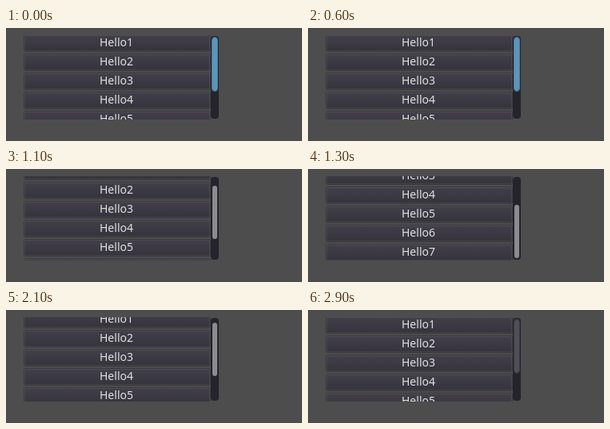
Animation, 370 px wide and 142 px high, one loop 3500 ms. Source, as an HTML page:

```html
<!DOCTYPE html>
<html lang="en">
<head>
<meta charset="utf-8">
<title>Scrolling list</title>
<style>
@property --s { syntax: "<number>"; inherits: true; initial-value: 0; }

html, body { margin: 0; width: 100%; height: 100%; overflow: hidden; background: #4d4d4d; }

#stage {
  position: relative; width: 370px; height: 142px; overflow: hidden;
  background: #4d4d4d;
  animation: scroll 3.5s step-end infinite;
}
#view { position: absolute; left: 22px; top: 9px; width: 234px; height: 106px; overflow: hidden; }
#list { position: absolute; left: 1px; top: calc(var(--s) * -1px); width: 232px; }

.item {
  box-sizing: border-box; height: 20px; margin-bottom: 4px; padding-right: 2px;
  border-radius: 2px;
  background: linear-gradient(#423f4a, #35333c);
  box-shadow: inset 0 0 0 1px rgba(255, 255, 255, .07), 0 0 0 1px rgba(30, 28, 34, .4);
  font: 14px/18px "Noto Sans", "Open Sans", sans-serif;
  color: #e0e0e0; text-align: center;
}
.item:first-child { animation: hover 3.5s step-end infinite; }

#bar {
  position: absolute; left: 256px; top: 10px; width: 10px; height: 104px;
  border-radius: 4px; background: #25232b;
}
#thumb {
  position: absolute; box-sizing: border-box; left: 1px; top: calc(1px + var(--s) * .57px);
  width: 8px; height: 69px; border: 1px solid; border-radius: 4px;
  background-clip: padding-box;
  animation: tint 3.5s step-end infinite;
}

/* percentages are ms / 35 */
@keyframes scroll {
  0% { --s: 0; }
  28.5714% { --s: 4; }
  31.4286% { --s: 16; }
  34.2857% { --s: 38; }
  37.1429% { --s: 58; }
  54.2857% { --s: 44; }
  57.1429% { --s: 26; }
  60% { --s: 7; }
  62.8571%, 100% { --s: 0; }
}
@keyframes tint {
  0%, 17.1429% { background-color: #5b95bb; border-color: #4c7c9c; }
  5.7143%, 28.5714% { background-color: #8c8b90; border-color: transparent; }
  68.5714%, 100% { background-color: #504e57; border-color: #3b3942; }
}
@keyframes hover {
  0%, 82.8571%, 100% { background-image: linear-gradient(#423f4a, #35333c); }
  80% { background-image: linear-gradient(#484551, #3e3b46); }
}
</style>
</head>
<body>
<div id="stage">
  <div id="view">
    <div id="list">
      <div class="item">Hello1</div>
      <div class="item">Hello2</div>
      <div class="item">Hello3</div>
      <div class="item">Hello4</div>
      <div class="item">Hello5</div>
      <div class="item">Hello6</div>
      <div class="item">Hello7</div>
    </div>
  </div>
  <div id="bar"><div id="thumb"></div></div>
</div>
</body>
</html>
```
